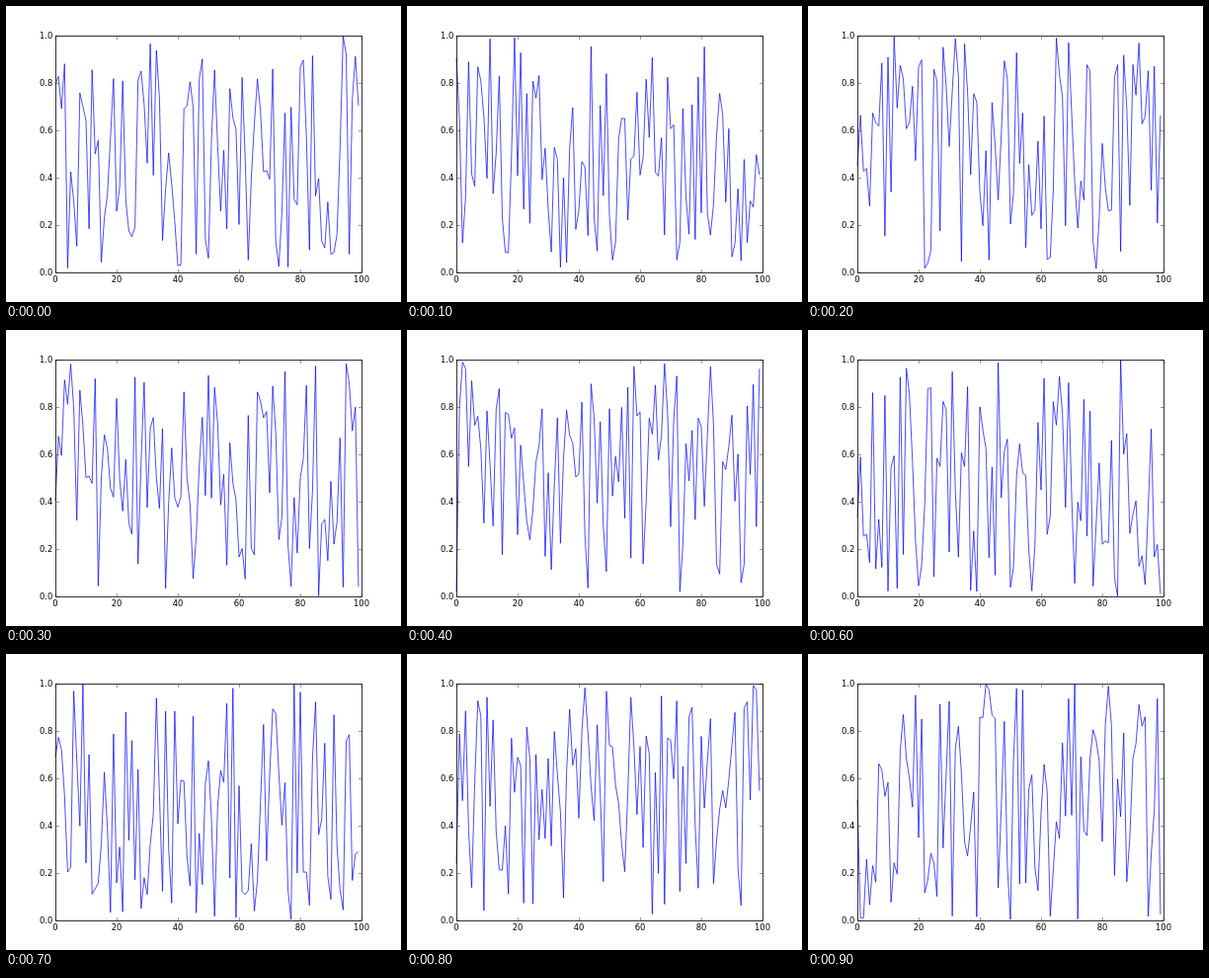
Animation of 400x300 px, one loop 1 s. Source, as an HTML page:

```html
<!DOCTYPE html>
<html lang="en">
<head>
<meta charset="utf-8">
<title>Random series</title>
<style>
  html, body { margin: 0; width: 100%; height: 100%; overflow: hidden; background: #fff; }
  svg { display: block; width: 400px; height: 300px; }
  text { font: 8.33px "DejaVu Sans", sans-serif; fill: #000; }
  path, rect { fill: none; stroke: #000; }
  .frame { stroke-width: 0.8; }
  .ticks { stroke-width: 0.4; }
  .line { stroke: #00f; stroke-width: 0.7; stroke-linejoin: round; }
</style>
</head>
<body>
<svg viewBox="0 0 400 300">
  <path class="line" id="line"/>
  <rect class="frame" x="50.5" y="30.5" width="310" height="240"/>
  <path class="ticks" id="ticks"/>
  <g id="labels"></g>
</svg>
<script>
const COUNT = 100, STEP_MS = 100, STEPS = 10;
const px = i => 50 + 3.1 * i;
const py = v => 270 - 240 * v;
const byId = id => document.getElementById(id);

function random(seed) {
  return () => {
    seed = (seed + 0x6D2B79F5) | 0;
    let t = Math.imul(seed ^ (seed >>> 15), 1 | seed);
    t = (t + Math.imul(t ^ (t >>> 7), 61 | t)) ^ t;
    return ((t ^ (t >>> 14)) >>> 0) / 4294967296;
  };
}

// Uniform noise, fresh for every step of the loop.
function seriesPath(step) {
  const next = random(1000 + step * 77);
  const points = Array.from({ length: COUNT }, (_, i) => `${px(i).toFixed(2)} ${py(next()).toFixed(2)}`);
  return "M" + points.join("L");
}

function addLabel(text, x, y, anchor) {
  const el = document.createElementNS("http://www.w3.org/2000/svg", "text");
  el.setAttribute("x", x);
  el.setAttribute("y", y);
  el.setAttribute("text-anchor", anchor);
  el.textContent = text;
  byId("labels").append(el);
}

function drawAxes() {
  let d = "";
  for (let k = 0; k <= 5; k++) {
    const x = px(k * 20), y = py(k / 5);
    d += `M${x + 0.5} 270v-3M${x + 0.5} 31v3M51 ${y + 0.5}h3M360 ${y + 0.5}h-3`;
    addLabel(k * 20, x, 280, "middle");
    addLabel((k / 5).toFixed(1), 47.2, y + 3, "end");
  }
  byId("ticks").setAttribute("d", d);
}

const paths = Array.from({ length: STEPS }, (_, step) => seriesPath(step));
let shown = -1, origin = null;

function render(ms) {
  const step = Math.floor(ms / STEP_MS) % STEPS;
  if (step !== shown) byId("line").setAttribute("d", paths[shown = step]);
}

function tick(now) {
  if (origin === null) origin = now;
  render(now - origin);
  requestAnimationFrame(tick);
}

drawAxes();
render(0);
requestAnimationFrame(tick);
</script>
</body>
</html>
```
